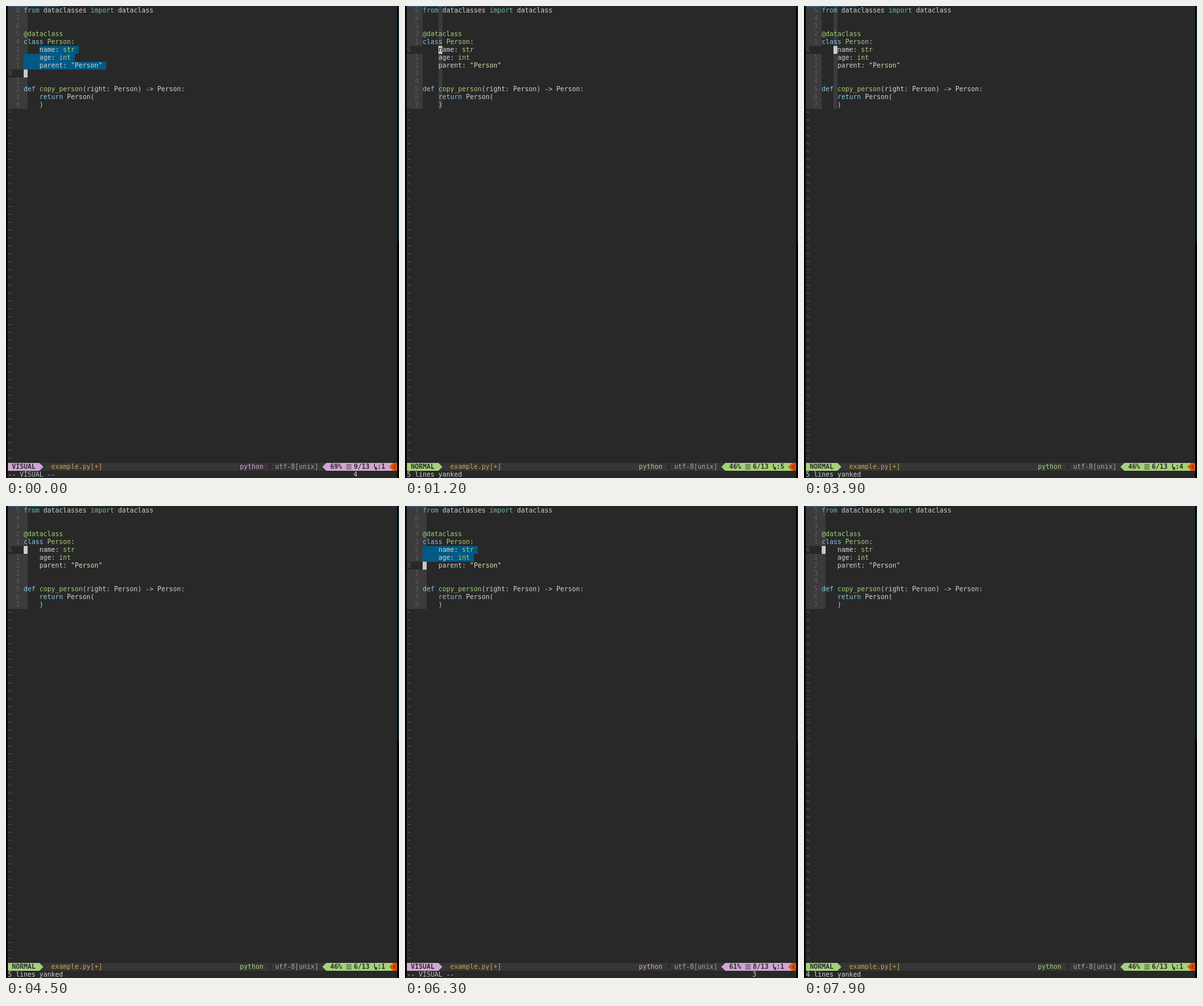
These frames come from a looping animation (600 px wide and 720 px high, 8 s). An HTML page:

```html
<!DOCTYPE html>
<html lang="en">
<head>
<meta charset="utf-8">
<title>Editor session</title>
<style>
  html, body { margin: 0; width: 100%; height: 100%; overflow: hidden; background: #000; }
  svg { display: block; width: 600px; height: 720px; }
  text { font: 10px "DejaVu Sans Mono", monospace; letter-spacing: -.02px; white-space: pre; }
  .bold { font-weight: bold; }
</style>
</head>
<body>
<svg id="stage" viewBox="0 0 600 720"></svg>
<script>
const LOOP = 8000, CELL = 6, ROW = 12, LEFT = 27;
const BG = '#282828', GUTTER = '#3b3b3b', FG = '#d0d0d0', DIM = '#5c5c5c';
const INK = { t: '#70b9a5', k: '#87c5e0', g: '#a5cc79', s: '#dbdbb2' };
const MODES = { NORMAL: '#a5d279', VISUAL: '#d2a5d3' };

// {x ...} colours a token with INK.x
const source = [
  '{t from} dataclasses {t import} dataclass',
  '',
  '',
  '{g @dataclass}',
  '{k class} {g Person}:',
  '    name: {g str}',
  '    age: {g int}',
  '    parent: {s "Person"}',
  '',
  '',
  '{k def} {g copy_person}(right: Person) -> Person:',
  '    {k return} Person(',
  '    )'
];
const plain = source.map(s => s.replace(/\{\w ([^}]*)\}/g, '$1'));
const FIRST = 6; // line where every selection starts

// [start ms, line, column, message, selection's first column]
const VIS = '-- VISUAL --';
const states = [
  [0, 9, 1, VIS, 5],
  [100, 10, 1, VIS, 5],
  [1100, 6, 5, '5 lines yanked'],
  [3800, 6, 4, '5 lines yanked'],
  [4000, 6, 3, '5 lines yanked'],
  [4200, 6, 2, '5 lines yanked'],
  [4400, 6, 1, '5 lines yanked'],
  [4700, 6, 1, VIS, 1],
  [4900, 7, 1, VIS, 1],
  [5700, 8, 1, VIS, 1],
  [6700, 9, 1, VIS, 1],
  [7700, 6, 1, '4 lines yanked']
];

const stage = document.getElementById('stage');
const rect = (x, y, w, h, fill) => `<rect x="${x}" y="${y}" width="${w}" height="${h}" fill="${fill}"/>`;
const poly = (points, fill) => `<polygon points="${points}" fill="${fill}"/>`;
const text = (x, row, s, fill = FG, cls = '') =>
  `<text x="${x}" y="${row * ROW + 10}" fill="${fill}" class="${cls}">${s}</text>`;
const rowY = row => row * ROW + 1;
const colX = col => LEFT + (col - 1) * CELL;
const highlight = s => s.replace(/\{(\w) ([^}]*)\}/g, (_, ink, word) => `<tspan fill="${INK[ink]}">${word}</tspan>`);

function buffer(line, col, from) {
  const end = rowY(source.length), cursorRow = line - 1, x = colX(col);
  let out = rect(3, 0, 24, end, GUTTER) + rect(3, rowY(cursorRow), 24, ROW, BG)
    + rect(x, 0, CELL, end, GUTTER);
  if (from) {
    for (let n = FIRST; n < line; n++) {
      const start = n === FIRST ? colX(from) : LEFT;
      out += rect(start, rowY(n - 1), colX(plain[n - 1].length + 2) - start, ROW, '#005a85');
    }
  }
  source.forEach((s, row) => {
    const gap = Math.abs(row - cursorRow);
    out += text(gap ? 15 : 3, row, gap || line, DIM) + text(LEFT, row, highlight(s));
  });
  out += rect(x, rowY(cursorRow), CELL, ROW, '#cacaca')
    + text(x, cursorRow, plain[cursorRow][col - 1] || '', BG);
  for (let row = source.length; row < 58; row++) out += text(3, row, '~', DIM);
  return out;
}

function statusLine(line, col, mode) {
  const tint = MODES[mode], dark = '#2c2c2c';
  const bold = (x, s) => text(x, 58, s, dark, 'bold');
  return rect(3, 697, 594, 12, '#363636')
    + rect(3, 697, 48, 12, tint) + poly('51,697 57,703 51,709', tint) + bold(9, mode)
    + text(69, 58, 'example.py[+]', '#d3a04f')
    + text(357, 58, 'python', tint)
    + poly('405,697 399,703 405,709', '#2b2b2b')
    + text(411, 58, 'utf-8[unix]', '#a5a5a5')
    + poly('483,703 489,697 591,697 591,709 489,709', tint)
    + bold(495, Math.floor(line / source.length * 100) + '%')
    + `<path d="M519.5 700h8m-8 3h8m-8 3h8M562.5 698v5.5h2M563.8 707.5v-4l2 4v-4" fill="none" stroke="${dark}" stroke-width="1.2"/>`
    + bold(531, `${line}/${source.length}`) + bold(567, ':' + col)
    + poly('585,703 591,697 597,697 597,709 591,709', '#dc5a0c')
    + poly('590,703 595,698 595,708', '#c53308');
}

function draw([, line, col, message, from]) {
  const visual = message === VIS;
  stage.innerHTML = rect(2.5, 0, 594.5, 720, BG)
    + rect(599, 0, 1, 360, '#14303f')
    + buffer(line, col, from)
    + rect(3, 0, 77, 1, '#39698c')
    + statusLine(line, col, visual ? 'VISUAL' : 'NORMAL')
    + text(3, 59, message, visual ? '#a9c8c1' : FG)
    + (visual ? text(530.5, 59, line - FIRST + 1) : '');
}

let shown;
function tick() {
  const t = performance.now() % LOOP;
  const state = states.findLast(s => s[0] <= t);
  if (state !== shown) draw(shown = state);
  requestAnimationFrame(tick);
}
tick();
</script>
</body>
</html>
```
